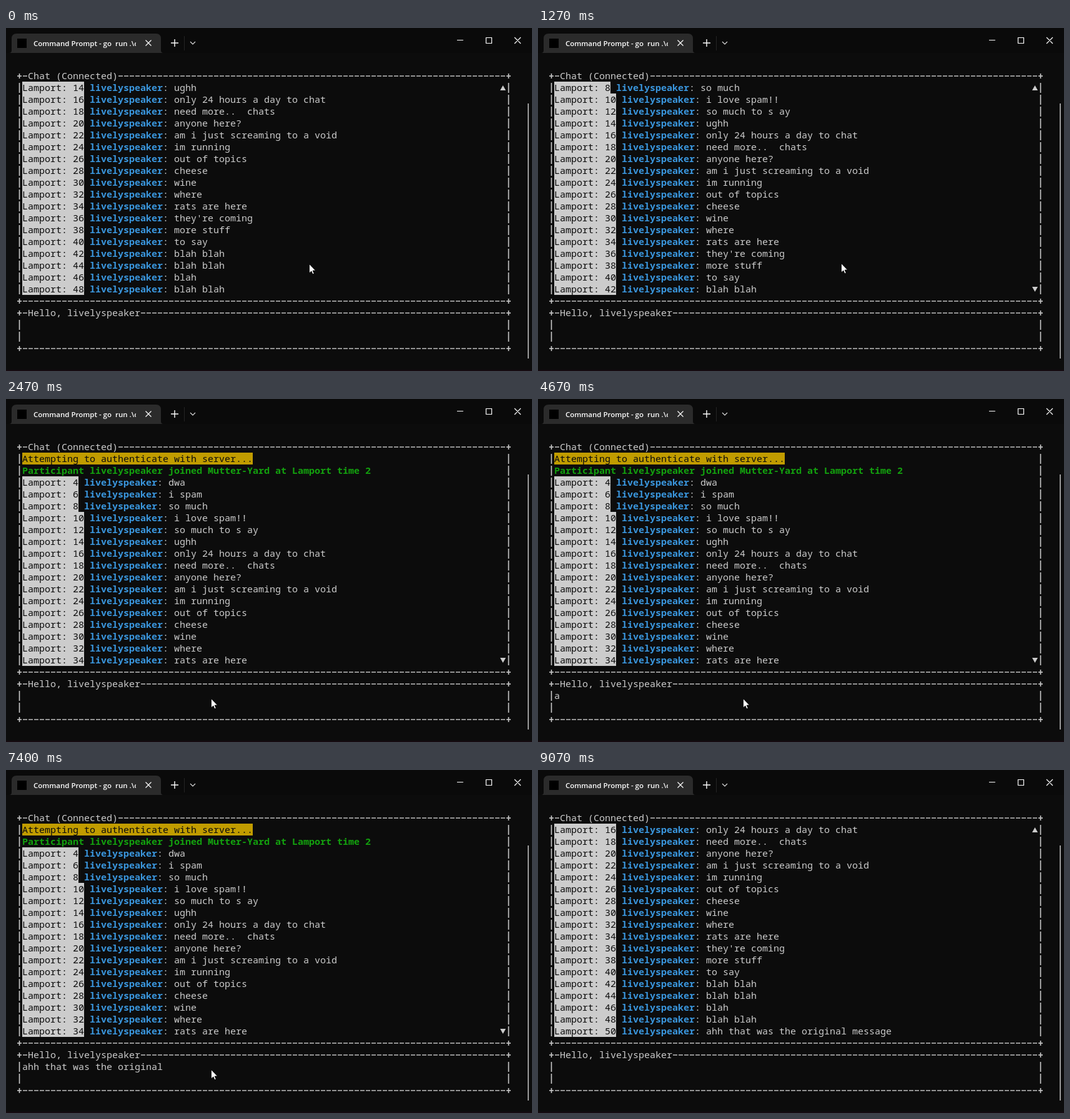
These frames come from a looping animation (842x550 px, 9590 ms). An HTML page with a canvas:

```html
<!DOCTYPE html>
<html lang="en">
<head>
<meta charset="utf-8">
<title>Terminal chat</title>
<style>
  html, body { margin: 0; width: 100%; height: 100%; overflow: hidden; background: #0c0c0c; }
  canvas { display: block; }
</style>
</head>
<body>
<canvas id="stage" width="842" height="550"></canvas>
<script>
const ctx = document.getElementById('stage').getContext('2d');
const LOOP = 9590, CELL = 9, LINE = 19, LEFT = 17, TOP = 67, LAST_COL = 87, VISIBLE = 18;
const MONO = '15px "Noto Sans Mono", "DejaVu Sans Mono", monospace';
const INK = '#cccccc', DARK = '#0c0c0c', BLUE = '#3a96dd', GREEN = '#13a10e', YELLOW = '#c19c00';
const USER = 'livelyspeaker';
const DRAFT = 'ahh that was the original message';

// Message n carries Lamport time 2n + 4.
const messages = ['dwa', 'i spam', 'so much', 'i love spam!!', 'so much to s ay', 'ughh',
  'only 24 hours a day to chat', 'need more..  chats', 'anyone here?',
  'am i just screaming to a void', 'im running', 'out of topics', 'cheese', 'wine', 'where',
  'rats are here', "they're coming", 'more stuff', 'to say', 'blah blah', 'blah blah', 'blah',
  'blah blah', DRAFT];

// Stepped timelines: [start ms, value...]
const SEND = 8200;
const scroll = [[0, 7], [730, 6], [1070, 5], [1270, 4], [1400, 3], [1470, 2], [1600, 1],
  [1670, 0], [SEND, 8]];
const typed = [[0, 0], [4670, 1], [5130, 2], [5330, 3], [5600, 5], [5730, 6], [5800, 7],
  [5930, 8], [6000, 10], [6130, 12], [6270, 14], [6330, 15], [6470, 16], [6600, 18],
  [6670, 19], [6800, 20], [6870, 21], [7000, 22], [7200, 23], [7330, 24], [7400, 25],
  [7600, 27], [7670, 28], [7800, 30], [7870, 31], [8070, 33], [SEND, 0]];
const pointer = [[0, 485, 378], [70, 485, 377], [2070, 484, 375], [2130, 474, 383],
  [2200, 444, 405], [2270, 400, 436], [2330, 360, 462], [2400, 335, 477], [2470, 328, 480],
  [8730, 332, 476], [8800, 326, 466], [8870, 308, 446], [8930, 284, 424], [9000, 264, 407],
  [9070, null, null]];

const at = (timeline, t) => timeline.findLast(([start]) => start <= t).slice(1);

function rect(x, y, w, h, color) {
  ctx.fillStyle = color;
  ctx.fillRect(x, y, w, h);
}

function stroke(path, color = '#ffffff', width = 1.2) {
  ctx.strokeStyle = color;
  ctx.lineWidth = width;
  ctx.stroke(new Path2D(path));
}

function fill(path, color) {
  ctx.fillStyle = color;
  ctx.fill(new Path2D(path));
}

// Writes on the character grid and returns the column after the text.
function write(col, row, text, color = INK, back = null, weight = 500) {
  const x = LEFT + col * CELL, y = TOP + row * LINE;
  if (back) rect(x, y, text.length * CELL, LINE, back);
  ctx.font = `${weight} ${MONO}`;
  ctx.fillStyle = color;
  ctx.fillText(text, x, y + 15);
  return col + text.length;
}

function border(row, title = '') {
  const y = TOP + row * LINE + 10;
  for (const col of [0, LAST_COL]) {
    const x = LEFT + col * CELL;
    rect(x + 1, y - 0.8, 7, 1.6, INK);
    rect(x + 3.7, y - 4, 1.6, 8, INK);
  }
  for (let col = 1; col < LAST_COL; col++) {
    if (col < 2 || col >= 2 + title.length) rect(LEFT + col * CELL + 1, y - 0.7, 7, 1.4, INK);
  }
  write(2, row, title);
}

function sides(first, last) {
  for (let row = first; row <= last; row++) {
    for (const col of [0, LAST_COL]) {
      rect(LEFT + col * CELL + 3.7, TOP + row * LINE + 2, 1.6, 16, INK);
    }
  }
}

function windowFrame() {
  rect(0, 0, 842, 550, DARK);
  rect(0, 0, 842, 40, '#0a0a0a');
  fill('M5 40Q9 40 9 36V17Q9 9 17 9H240Q248 9 248 17V36Q248 40 252 40Z', '#2b2b2b');
  rect(18, 17, 15, 15, '#000000');

  ctx.save();
  ctx.beginPath();
  ctx.rect(44, 10, 164, 30);
  ctx.clip();
  ctx.font = '600 11.5px "Open Sans", "Noto Sans", sans-serif';
  ctx.fillStyle = '#ffffff';
  ctx.fillText('Command Prompt - go  run .\\c', 44, 29);
  ctx.restore();

  stroke('M223.5 19.5l9 9m0-9l-9 9');
  stroke('M264 24h12m-6-6v12', '#ffffff', 1.4);
  stroke('M285.5 13v23', '#252525', 1);
  stroke('M295 22l4 4 4-4', '#dddddd');
  stroke('M722 19.5h10M768.5 15.5h9v9h-9zM814 15l10 10m0-10l-10 10');
  rect(835, 121, 2, 409, '#9a9a9a');
  rect(0, 548, 842, 2, '#140a10');
}

function chatLine(index, row) {
  if (index === 0) {
    write(1, row, 'Attempting to authenticate with server...', DARK, YELLOW);
  } else if (index === 1) {
    write(1, row, `Participant ${USER} joined Mutter-Yard at Lamport time 2`, GREEN, null, 600);
  } else {
    let col = write(1, row, `Lamport: ${index * 2}`, DARK, INK);
    col = write(col + 1, row, USER, BLUE, null, 600);
    write(col, row, ': ' + messages[index - 2]);
  }
}

function drawPointer(x, y) {
  ctx.save();
  ctx.translate(x, y);
  const arrow = 'M.5 .5V15L3.8 11.9 6 16.8 8.2 15.8 6.1 11H10.5Z';
  fill(arrow, '#ffffff');
  stroke(arrow, '#000000', 0.8);
  ctx.restore();
}

function draw() {
  const t = performance.now() % LOOP;
  const [offset] = at(scroll, t);
  const total = messages.length + 2 - (t < SEND ? 1 : 0);

  windowFrame();
  border(0, 'Chat (Connected)');
  sides(1, VISIBLE);
  border(19);
  border(20, `Hello, ${USER}`);
  sides(21, 22);
  border(23);

  for (let row = 1; row <= VISIBLE; row++) chatLine(offset + row - 1, row);
  if (offset > 0) fill('M791 100L795.5 92 800 100Z', INK);
  if (offset + VISIBLE < total) fill('M791 415L795.5 423 800 415Z', INK);

  write(1, 21, DRAFT.slice(0, at(typed, t)[0]));
  const [x, y] = at(pointer, t);
  if (x !== null) drawPointer(x, y);
  requestAnimationFrame(draw);
}
draw();
</script>
</body>
</html>
```
